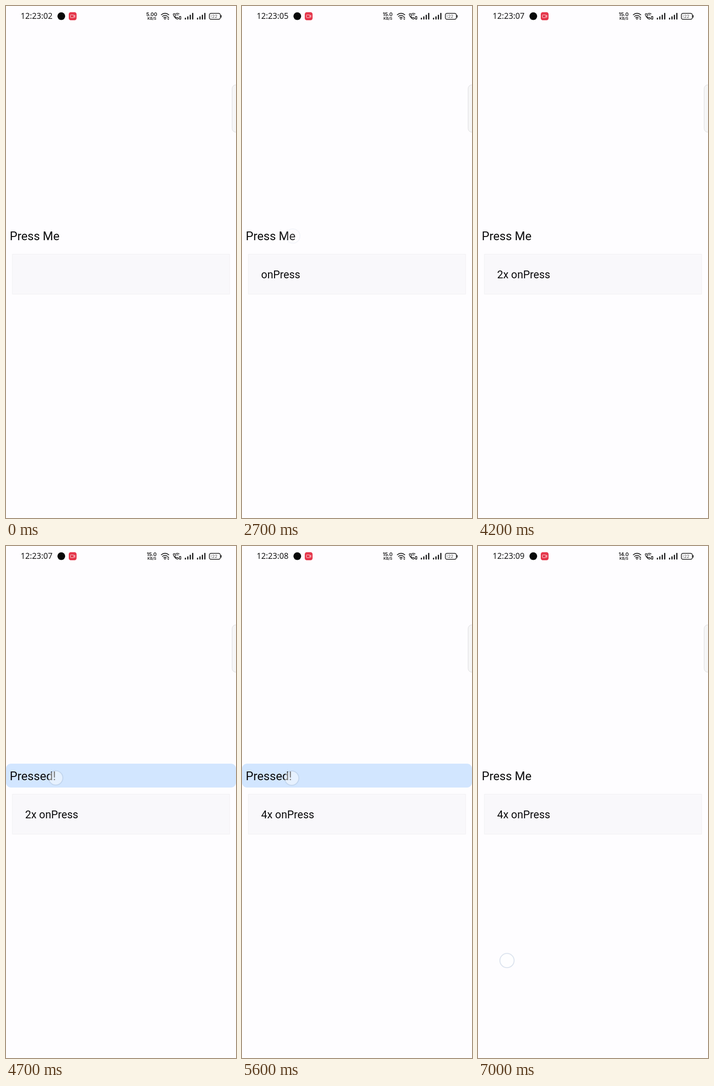
An HTML page for the animation above (7.1 s loop, 502 by 1115 pixels).

```html
<!DOCTYPE html>
<html lang="en">
<head>
<meta charset="utf-8">
<title>Press counter</title>
<style>
  html, body { margin: 0; width: 100%; height: 100%; overflow: hidden; background: #fefdff; }
  svg { display: block; width: 502px; height: 1115px; }
  .app { font-family: Roboto, sans-serif; fill: #0b0b0c; }
  .clock { font: 17.5px "Noto Sans", sans-serif; fill: #161616; }
  .net { font-family: Inter, sans-serif; font-weight: 600; text-anchor: middle; fill: #161616; }
  .line { fill: none; stroke: #161616; stroke-width: 1.7; stroke-linecap: round; stroke-linejoin: round; }
</style>
</head>
<body>
<svg viewBox="0 0 502 1115">
  <defs>
    <g id="bars" fill="#161616">
      <rect x="0" y="25.5" width="2.6" height="4" rx="1"/>
      <rect x="5.3" y="22.5" width="2.6" height="7" rx="1"/>
      <rect x="10.6" y="19" width="2.6" height="10.5" rx="1"/>
      <rect x="15.9" y="15" width="2.6" height="14.5" rx="1"/>
    </g>
  </defs>

  <text id="clock" class="clock" x="32" y="28.3"></text>
  <circle cx="120.7" cy="22.2" r="8.4" fill="#080808"/>
  <rect x="137" y="13.5" width="17" height="17.5" rx="4.5" fill="#e5364a"/>
  <g fill="none" stroke="#fff" stroke-opacity=".8">
    <rect x="140.5" y="19.3" width="7.5" height="6" rx="1"/>
    <path d="M148 21.5l2.5-1.5v4.6l-2.5-1.5"/>
  </g>

  <text id="speed" class="net" x="318" y="22.4" font-size="11"></text>
  <text class="net" x="318.4" y="30.2" font-size="8">KB/S</text>

  <g class="line">
    <path d="M339 19.2Q347 12.7 355.3 19.2M341.6 22.6Q347 18 352.6 22.6M344.2 25.8Q347 23.4 349.8 25.8"/>
    <path d="M365.3 17.3q-.7 2.2 2 6q3.300 4.600 6.500 5.300q2.300.2 2.700-2l-2.900-2l-2 1.200q-2.100-1.300-2.900-3.700l1.200-1.500l-1.700-3.600q-1.800-.8-2.900.3z" stroke-width="1.4"/>
    <path d="M370 17q4-2 8 0M371.800 19.600q2.200-1 4.400 0" stroke-width="1.3"/>
    <rect x="378.600" y="22.800" width="3" height="6" rx=".6" stroke-width="1.4"/>
    <rect x="443.800" y="16" width="24" height="13" rx="3.800" stroke-width="1.500"/>
    <path d="M469.600 20.500v4"/>
  </g>
  <circle cx="347" cy="28.200" r="1.400" fill="#161616"/>
  <path d="M352 25.800l2.200-2.800 2.200 2.800zM352 27.400h4.400l-2.200 2.800z" fill="#161616"/>
  <use href="#bars" x="390.300"/>
  <use href="#bars" x="416.800"/>
  <rect x="446.300" y="18.500" width="3" height="8" rx="1" fill="#d2d2d2"/>
  <text x="455.500" y="26" font-family="Inter, sans-serif" font-size="9.500" text-anchor="middle" fill="#555">22</text>

  <rect x="493.500" y="171.800" width="20" height="103" rx="8" fill="#f6f6f7" stroke="#dcdcde"/>
  <rect id="highlight" x="0" y="474" width="502" height="52" rx="11" fill="#d2e6ff"/>
  <rect x="14" y="540.500" width="474" height="87" fill="#f9f8fb" stroke="#f0eff2"/>
  <text id="label" class="app" x="8.300" y="510.300" font-size="26"></text>
  <text id="log" class="app" x="41.800" y="593.400" font-size="23.400"></text>
  <circle id="touch" r="15.500" fill="#fff" fill-opacity=".45" stroke="#8ca5c8" stroke-opacity=".3" stroke-width="2"/>
</svg>

<script>
const LOOP = 7100;
const el = id => document.getElementById(id);

// Each table row is [start ms, value]; values hold until the next row.
const seconds = [[0, 2], [200, 3], [1200, 4], [2200, 5], [3200, 6], [4200, 7], [5200, 8], [6200, 9]];
const speeds = [[0, "5.00"], [2200, "15.0"], [6200, "14.0"]];
const presses = [
  { at: 2500, x: 111, y: 501, fade: .3 },
  { at: 3600, x: 109, y: 488.5, fade: .25 },
  { at: 4700, x: 108.5, y: 505, fade: .12 },
  { at: 5500, x: 108.5, y: 505.5, fade: .2 }
];
const taps = [...presses, { at: 6200, x: 69.5, y: 883.5, fade: .3 }];

const held = (table, t) => table.filter(row => row[0] <= t).pop()[1];

function touchAt(t) {
  if (t >= 6900) return { x: 63.3, y: 902.8, alpha: t < 7000 ? .6 : 1 };
  const tap = taps.find(p => t >= p.at && t < p.at + 300);
  return tap ? { ...tap, alpha: t < tap.at + 200 ? 1 : tap.fade } : { x: 0, y: 0, alpha: 0 };
}

function draw(t) {
  const pressed = presses.some(p => t >= p.at && t < p.at + 200);
  const count = presses.filter(p => t >= p.at + 100).length;
  const touch = touchAt(t);

  el("clock").textContent = "12:23:0" + held(seconds, t);
  el("speed").textContent = held(speeds, t);
  el("label").textContent = pressed ? "Pressed!" : "Press Me";
  el("log").textContent = count > 1 ? count + "x onPress" : count ? "onPress" : "";
  el("highlight").setAttribute("opacity", pressed ? 1 : 0);
  el("touch").setAttribute("cx", touch.x);
  el("touch").setAttribute("cy", touch.y);
  el("touch").setAttribute("opacity", touch.alpha);
}

const start = performance.now();
function tick() {
  draw((performance.now() - start) % LOOP);
  requestAnimationFrame(tick);
}
tick();
</script>
</body>
</html>
```
